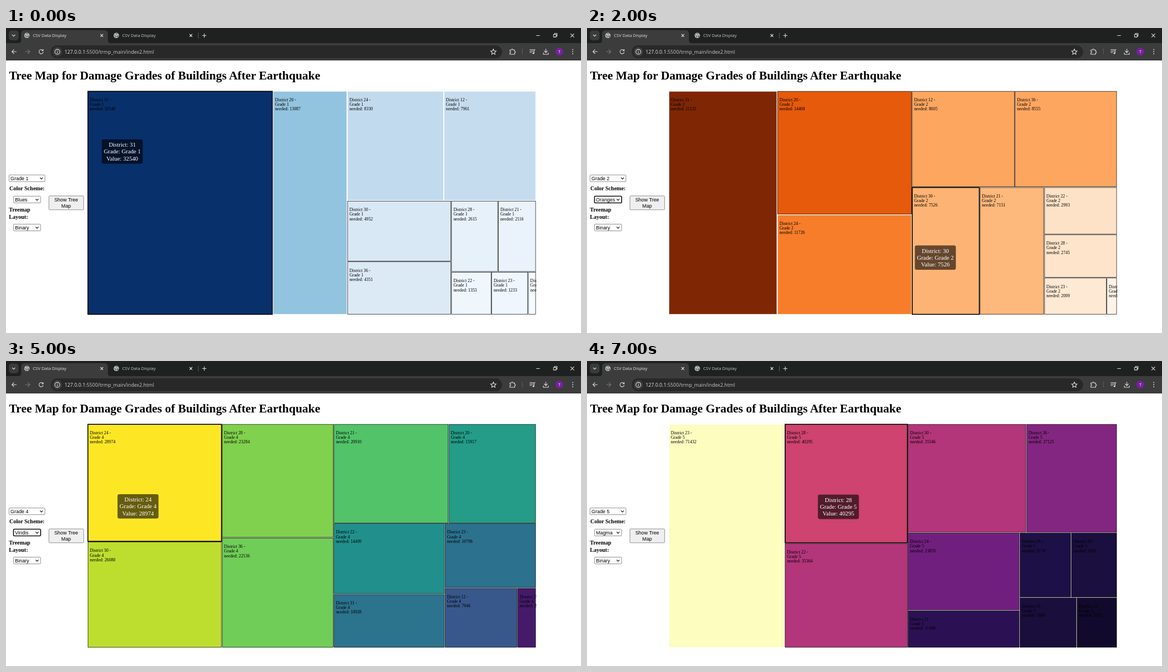
Write an HTML page that moves like this. It is 1027 px wide and 545 px high and loops after 8000 ms.

```html
<!DOCTYPE html>
<html lang="en">
<head>
<meta charset="utf-8">
<title>Tree map</title>
<style>
html, body { margin: 0; width: 100%; height: 100%; overflow: hidden; background: #fff; }
#stage { display: block; }
text { white-space: pre; }
.ui { font-family: "Open Sans", "Noto Sans", sans-serif; }
.serif { font-family: "Liberation Serif", "Times New Roman", serif; }
.form { font: 8.9px "Liberation Sans", Arial, sans-serif; }
.bold { font-weight: bold; font-size: 10.03px; }
.icon { fill: none; stroke: #dcdcdc; stroke-width: 1.1; }
</style>
</head>
<body>
<svg id="stage" width="1027" height="545" viewBox="0 0 1027 545">
  <g class="ui">
    <rect width="1027" height="58" fill="#1f2121"/>
    <rect y="27" width="1027" height="31" fill="#3c3c3c"/>
    <path d="M22 27Q27 27 27 22V10Q27 4 33 4H176Q182 4 182 10V22Q182 27 187 27Z" fill="#3c3c3c"/>
    <rect x="5" y="4.5" width="17.5" height="17.5" rx="5" fill="#3a3b3b"/>
    <path class="icon" d="M11 12l2.7 2.7 2.7-2.7"/>
    <g id="globe">
      <circle cx="37.3" cy="13.3" r="4.8" fill="#bdc1c6"/>
      <path d="M33.3 12l3 2.2v3M36 9.2l1.2 1.7 2.6-.5M38 14.2l2.6-.5-1 2.8z" fill="#777" stroke="#555" stroke-width=".9"/>
    </g>
    <use href="#globe" x="159.7"/>
    <g font-size="7.6">
      <text x="48" y="16.2" fill="#e3e3e3">CSV Data Display</text>
      <text x="207.5" y="16.2" fill="#c7c7c7">CSV Data Display</text>
    </g>
    <path class="icon" d="M168.7 11l4.8 4.8m0-4.8l-4.8 4.8M327.8 11l4.8 4.8m0-4.8l-4.8 4.8M354.2 9.8v7.4M350.5 13.5h7.4"/>
    <path d="M343.5 8.5v10M922.3 37v10" stroke="#5c5e5e"/>
    <path class="icon" stroke-width=".9" d="M947 13.5h6.5M978 11.5h4.6v4.6H978zM979.6 11v-1.2h4.6v4.6H983M1008.3 10.2l6.4 6.4m0-6.4l-6.4 6.4"/>
    <rect x="80" y="31" width="806" height="23" rx="11.5" fill="#282828"/>
    <circle cx="91.7" cy="42.5" r="8.4" fill="#3c3c3c"/>
    <circle class="icon" cx="91.7" cy="42.5" r="4.4"/>
    <path class="icon" d="M91.7 42v2.8M91.7 39.9v1.1"/>
    <text x="104.5" y="45.8" font-size="8.8" fill="#e3e3e3">127.0.0.1<tspan fill="#c7c7c7">:5500/trmp_main/index2.html</tspan></text>
    <path class="icon" d="M18.8 42.2h-8M14.4 38.4l-3.8 3.8 3.8 3.8M66 40.3a3.8 3.8 0 1 0 .5 2.8M66.4 38v2.8h-2.8"/>
    <path class="icon" style="stroke:#777" d="M34.4 42.2h8M38.8 38.4l3.8 3.8-3.8 3.8"/>
    <path class="icon" d="M870.5 37.7l1.4 3.1 3.4.4-2.5 2.3.7 3.4-3-1.7-3 1.7.7-3.4-2.5-2.3 3.4-.4z"/>
    <path class="icon" d="M900 39.2h2.8q0-1.7 1.4-1.7t1.4 1.7h2.8v2.6q1.6 0 1.6 1.3t-1.6 1.3v2.6H900v-2.6q1.6-.3 1.6-1.4T900 41.7z"/>
    <path class="icon" d="M935.3 38.8h7M935.3 41.3h7M935.3 43.8h4M943.2 45v-6.2h2.3"/>
    <circle cx="942" cy="45" r="1.6" fill="#dcdcdc"/>
    <path class="icon" d="M964.2 37.2v6.3M961 40.7l3.2 3.2 3.2-3.2M959.8 44v3h8.8v-3"/>
    <circle cx="988.3" cy="42.2" r="6.7" fill="#7b1fa2"/>
    <text x="988.3" y="44.6" font-size="6.7" text-anchor="middle" fill="#fff">T</text>
    <path d="M1012.3 38.4v.01m0 3.8v.01m0 3.8v.01" stroke="#dcdcdc" stroke-width="1.9" stroke-linecap="round"/>
  </g>
  <g class="serif">
    <text x="5.4" y="92.3" font-size="21.4" font-weight="bold">Tree Map for Damage Grades of Buildings After Earthquake</text>
    <text class="bold" x="6" y="290.3">Color Scheme:</text>
    <text class="bold" x="5.3" y="328">Treemap</text>
    <text class="bold" x="5.3" y="340.5">Layout:</text>
  </g>
  <g class="form" text-anchor="middle">
    <rect x="76.7" y="300" width="62" height="24.8" rx="1.5" fill="#efefef" stroke="#767676" stroke-width=".8"/>
    <text x="107.4" y="310">Show Tree</text>
    <text x="107.4" y="320.7">Map</text>
  </g>
  <g id="selects" class="form"></g>
  <svg id="map" class="serif" x="145" y="111.8" width="802.3" height="401.2" viewBox="0 0 1200 600" font-size="11.7"></svg>
  <g id="tip" class="serif" font-size="10.7" fill="#fff" text-anchor="middle"></g>
</svg>
<script>
const $ = id => document.getElementById(id);

// [district, buildings] per grade, largest first
const grades = [
  [[31, 32540], [20, 13087], [24, 8330], [12, 7961], [30, 4952], [36, 4351], [28, 2615], [21, 2116], [22, 1353], [23, 1233], [29, 269]],
  [[31, 21135], [20, 14469], [24, 11726], [12, 8605], [36, 8555], [30, 7526], [21, 7151], [22, 2993], [28, 2745], [23, 2009], [29, 335]],
  [[24, 25130], [31, 18525], [20, 17085], [21, 16945], [36, 15507], [30, 15218], [12, 9220], [28, 8209], [22, 6520], [23, 3271], [29, 782]],
  [[24, 28974], [30, 26080], [28, 23284], [36, 22536], [21, 20910], [20, 15917], [22, 14409], [31, 10928], [23, 10796], [12, 7946], [29, 2054]],
  [[23, 71432], [28, 40295], [22, 35364], [30, 35346], [36, 27125], [24, 23859], [21, 11490], [29, 9178], [20, 8181], [31, 7866], [12, 5575]]
];

const schemes = {
  Blues: 'f7fbff deebf7 c6dbef 9ecae1 6baed6 4292c6 2171b5 08519c 08306b',
  Greens: 'f7fcf5 e5f5e0 c7e9c0 a1d99b 74c476 41ab5d 238b45 006d2c 00441b',
  Oranges: 'fff5eb fee6ce fdd0a2 fdae6b fd8d3c f16913 d94801 a63603 7f2704',
  Purples: 'fcfbfd efedf5 dadaeb bcbddc 9e9ac8 807dba 6a51a3 54278f 3f007d',
  Reds: 'fff5f0 fee0d2 fcbba1 fc9272 fb6a4a ef3b2c cb181d a50f15 67000d',
  Viridis: '440154 472d7b 3b528b 2c728e 21918c 28ae80 5ec962 addc30 fde725',
  Magma: '000004 1c1044 4f127b 812581 b5367a e55064 fb8761 fec287 fcfdbf'
};

// One scene per second; plain lists the districts not yet hovered
const scenes = [
  { grade: 1, scheme: 'Blues', hover: 31, plain: [20, 24, 12], tip: [171, 199] },
  { grade: 1, scheme: 'Greens', focus: 2, hover: 12, plain: [30, 36, 28, 21, 22, 23, 29], tip: [888.8, 210] },
  { grade: 2, scheme: 'Oranges', focus: 2, hover: 30, plain: [31, 24], tip: [585.6, 388.5] },
  { grade: 3, scheme: 'Purples', focus: 2, hover: 24, plain: [31, 20, 21, 36, 28], tip: [474, 243.2] },
  { grade: 3, scheme: 'Reds', focus: 2, hover: 29, plain: [24, 21, 30, 12, 22, 23], tip: [925.8, 467.6] },
  { grade: 4, scheme: 'Viridis', focus: 2, hover: 24, plain: [], tip: [199.2, 238] },
  { grade: 5, scheme: 'Viridis', focus: 1, plain: grades[4].map(d => d[0]) },
  { grade: 5, scheme: 'Magma', hover: 28, plain: [23], tip: [412.4, 238.8] }
];

function color(name, t) {
  const stops = schemes[name].split(' ');
  const n = stops.length - 1, i = Math.min(Math.floor(t * n), n - 1), u = t * n - i;
  const linear = name === 'Viridis' || name === 'Magma';
  const rgb = [0, 2, 4].map(c => {
    const v = k => parseInt(stops[k].slice(c, c + 2), 16);
    const b = v(i), d = v(i + 1);
    if (linear) return Math.round(b + (d - b) * u);
    const a = i > 0 ? v(i - 1) : 2 * b - d;
    const e = i < n - 1 ? v(i + 2) : 2 * d - b;
    // uniform cubic B-spline
    return Math.round(((1 - u) ** 3 * a + (4 - 6 * u * u + 3 * u ** 3) * b
      + (1 + 3 * u + 3 * u * u - 3 * u ** 3) * d + u ** 3 * e) / 6);
  });
  return `rgb(${rgb})`;
}

// Binary treemap: halve the total as evenly as possible, cut the longer side
function layout(data) {
  const sums = [0], boxes = [];
  data.forEach(([, v], i) => sums.push(sums[i] + v));
  (function split(i, j, x0, y0, x1, y1) {
    if (j - i < 2) {
      boxes[i] = [x0 + 1, y0 + 1, x1 - x0 - 2, y1 - y0 - 2];
      return;
    }
    const half = (sums[i] + sums[j]) / 2;
    let k = i + 1;
    while (k < j - 1 && sums[k] < half) k++;
    if (half - sums[k - 1] < sums[k] - half && i + 1 < k) k--;
    const part = (sums[k] - sums[i]) / (sums[j] - sums[i]);
    if (x1 - x0 > y1 - y0) {
      const x = x0 + (x1 - x0) * part;
      split(i, k, x0, y0, x, y1);
      split(k, j, x, y0, x1, y1);
    } else {
      const y = y0 + (y1 - y0) * part;
      split(i, k, x0, y0, x1, y);
      split(k, j, x0, y, x1, y1);
    }
  })(0, data.length, 1, 1, 1199, 599);
  return boxes;
}

const lines = (x, y, step, list) =>
  list.map((s, i) => `<text x="${x}" y="${y + i * step}">${s}</text>`).join('');

function select(x, y, w, label, focused) {
  const border = focused ? 'stroke="#101010" stroke-width="1.6"' : 'stroke="#767676" stroke-width=".8"';
  return `<rect x="${x}" y="${y}" width="${w}" height="12" rx="1.5" fill="#fff" ${border}/>
    <text x="${x + 2.7}" y="${y + 9.1}">${label}</text>
    <path d="M${x + w - 8.8} ${y + 4.8}l2.5 2.5 2.5-2.5" fill="none" stroke="#111" stroke-width="1.2"/>`;
}

function draw({ grade, scheme, focus, hover, plain, tip }) {
  const data = grades[grade - 1], boxes = layout(data);
  $('selects').innerHTML = select(5.4, 262.6, 64.2, 'Grade ' + grade, focus === 1)
    + select(13.4, 300.5, 48.4, scheme, focus === 2)
    + select(13.4, 350.5, 48.4, 'Binary');
  $('map').innerHTML = data.map(([id, value], i) => {
    const [x, y, w, h] = boxes[i];
    return `<rect x="${x}" y="${y}" width="${w}" height="${h}" fill="${color(scheme, value / data[0][1])}"
      stroke="${plain.includes(id) ? '#fff' : '#000'}" stroke-width="${id === hover ? 2.4 : 1}"/>`
      + lines(x + 5, y + 26.6, 12.3, [`District ${id} -`, `Grade ${grade}`, `needed: ${value}`]);
  }).join('');
  $('tip').innerHTML = tip ? `<rect x="${tip[0]}" y="${tip[1]}" width="73.2" height="43.6" rx="3.3" fill="#000" fill-opacity=".6"/>`
    + lines(tip[0] + 36.6, tip[1] + 13, 12.25, [`District: ${hover}`, `Grade: Grade ${grade}`,
      `Value: ${data.find(d => d[0] === hover)[1]}`]) : '';
}

const start = performance.now();
let shown = -1;
function tick() {
  const i = Math.floor((performance.now() - start) / 1000) % scenes.length;
  if (i !== shown) draw(scenes[shown = i]);
  requestAnimationFrame(tick);
}
tick();
</script>
</body>
</html>
```
